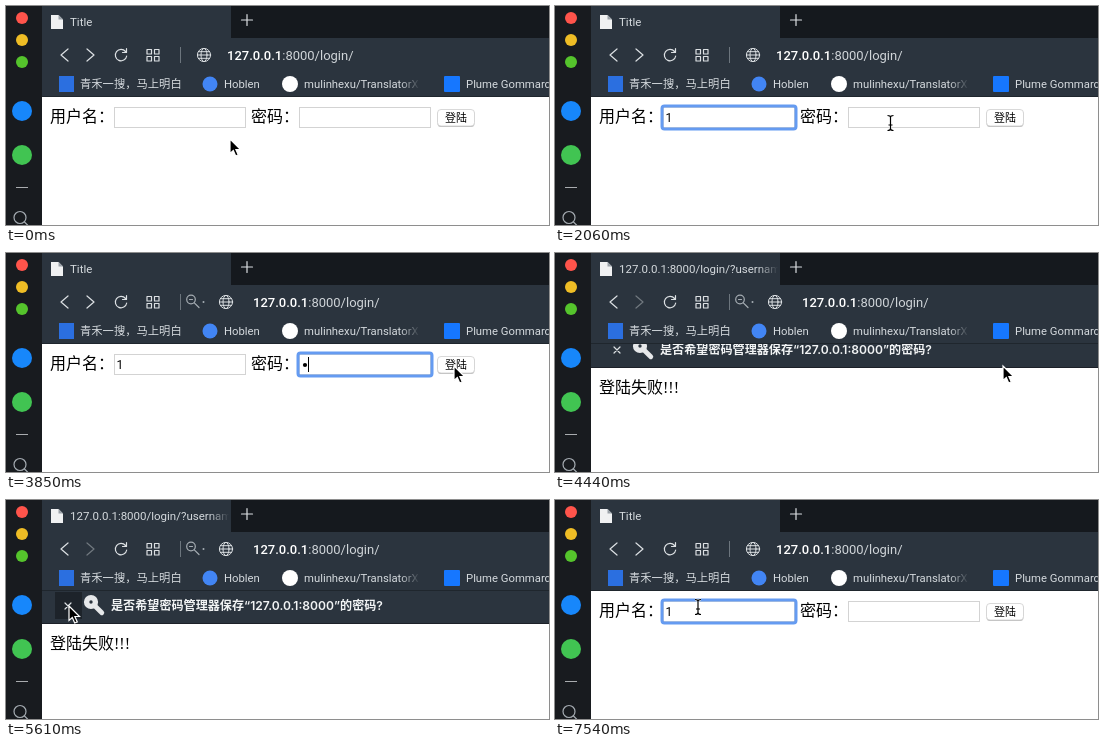
Animation of 543 by 219 pixels, one loop 7990 ms. Source, as an HTML page:

```html
<!DOCTYPE html>
<html lang="zh-CN">
<head>
<meta charset="utf-8">
<title>Login</title>
<style>
  html, body { margin: 0; width: 100%; height: 100%; overflow: hidden; background: #fff; }
  svg { display: block; width: 100vw; height: 100vh; }
  text { font-family: Roboto, "Noto Sans CJK SC", "Noto Sans CJK", sans-serif; }
  .line { fill: none; stroke: #dce0e3; stroke-width: 1.2; stroke-linecap: round; stroke-linejoin: round; }
  .thin { stroke-width: 1; }
  .dim { stroke: #a5acb2; }
  .tab { font-size: 11.5px; fill: #d5dade; }
  .mark { font-size: 11.3px; fill: #d5dade; }
  .url { font-size: 13px; fill: #d0d5d9; }
  .url tspan { fill: #fff; font-weight: 500; }
  .ask { font: 600 12.1px Inter, "Noto Sans CJK SC", "Noto Sans CJK", sans-serif; fill: #f1f3f4; }
  .body { font: 500 16px "Liberation Serif", "Noto Sans CJK SC", "Noto Sans CJK", serif; fill: #000; }
  .field { fill: #fff; stroke: #d3d3d3; }
  .ring { fill: none; stroke: #659bf1; stroke-width: 3; }
  .small { font-size: 12px; fill: #000; }
</style>
</head>
<body>
<svg viewBox="0 0 543 219" preserveAspectRatio="none">
  <defs>
    <linearGradient id="fade">
      <stop offset="0" stop-color="#2b343e" stop-opacity="0"/>
      <stop offset="1" stop-color="#2b343e"/>
    </linearGradient>
    <clipPath id="tabClip"><rect x="36" width="187" height="32"/></clipPath>
  </defs>

  <rect width="543" height="219" fill="#fff"/>

  <g id="form">
    <text class="body" x="44" y="116">用户名：</text>
    <rect class="field" x="108.5" y="101.5" width="131" height="20"/>
    <text class="body" x="245" y="116">密码：</text>
    <rect class="field" x="293.5" y="101.5" width="131" height="20"/>
    <rect x="431.5" y="104" width="37" height="17" rx="3.5" fill="#bdbdbd"/>
    <rect x="431.5" y="103.5" width="37" height="16.5" rx="3.5" fill="#fff" stroke="#d0d0d0" stroke-width=".8"/>
    <text class="small" x="450" y="116" text-anchor="middle" style="font-size:11px">登陆</text>
    <rect id="ring" class="ring" y="100" width="134" height="23" rx="2.5"/>
    <text id="user" class="small" x="110.5" y="116">1</text>
    <circle id="dot" cx="299" cy="112" r="2.1"/>
    <rect id="caret" y="104" width="1" height="15"/>
  </g>

  <text id="fail" class="body" x="44" y="116">登陆失败!!!</text>

  <g id="bar">
    <rect x="36" y="91" width="507" height="33" fill="#2b343e"/>
    <rect x="36" y="123" width="507" height="1" fill="#1c2028"/>
    <rect id="hover" x="49" y="92" width="27" height="27" fill="#1d232a"/>
    <path class="line" d="M59 103l6 6m0-6l-6 6"/>
    <g fill="none" stroke="#e6e8ea" stroke-linecap="round">
      <circle cx="85" cy="102" r="4.4" stroke-width="5.4"/>
      <path d="M89 106l6.800 6.800" stroke-width="4.800"/>
    </g>
    <text class="ask" x="105" y="110">是否希望密码管理器保存“127.0.0.1:8000”的密码?</text>
  </g>

  <rect x="36" width="507" height="33" fill="#15191e"/>
  <rect x="36" y="32" width="507" height="59" fill="#2b343e"/>
  <rect x="36" y="90" width="507" height="1" fill="#1f262d"/>
  <rect x="36" width="189" height="33" fill="#2b343e"/>
  <path d="M45 9h7.500l4.500 4.500v9.500h-12z" fill="#f0f1f2"/>
  <path d="M52.500 9v4.500h4.500" fill="#9aa1a8"/>
  <g clip-path="url(#tabClip)">
    <text id="title" class="tab" x="64" y="20"></text>
    <rect x="203" y="6" width="20" height="20" fill="url(#fade)"/>
  </g>
  <path class="line" d="M235.500 14h11m-5.500-5.500v11"/>

  <path class="line" d="M62 43l-7 6 7 6"/>
  <path id="next" class="line" d="M81 43l7 6-7 6"/>
  <path class="line" d="M119.500 45.500a5.700 5.700 0 1 0 1.200 4.500M120.500 42.500v4h-4"/>
  <path class="line" d="M141 43.500h4.500v4.500h-4.500zm7.500 0h4.500v4.500h-4.500zm-7.500 7h4.500v4.500h-4.500zm7.500 0h4.500v4.500h-4.500z"/>
  <path d="M174.500 41v16" stroke="#6c757d"/>
  <g id="key">
    <g class="line dim">
      <circle cx="185" cy="46.500" r="4.300"/>
      <path d="M183.500 46.500h3M188.300 49.800l4.700 4.700"/>
    </g>
    <circle cx="197.500" cy="49" r="1" fill="#a7aeb4"/>
  </g>
  <g id="globe" class="line thin">
    <circle cx="198" cy="49" r="6.600"/>
    <ellipse cx="198" cy="49" rx="3" ry="6.600"/>
    <path d="M191.500 49h13m-12-3.300h11m-11 6.600h11"/>
  </g>
  <text id="url" class="url" y="54"><tspan>127.0.0.1</tspan>:8000/login/</text>

  <rect x="53" y="70" width="15" height="16" fill="#2b6fe0"/>
  <text class="mark" x="74" y="82">青禾一搜，马上明白</text>
  <circle cx="204" cy="78" r="7.500" fill="#4285f4"/>
  <text class="mark" x="218" y="82">Hoblen</text>
  <circle cx="284" cy="78" r="8" fill="#fff"/>
  <text class="mark" x="298" y="82">mulinhexu/TranslatorX</text>
  <rect x="394" y="70" width="20" height="17" fill="url(#fade)"/>
  <rect x="414" y="70" width="16" height="17" fill="#2b343e"/>
  <rect x="438" y="70" width="16" height="16" rx="1" fill="#1677ff"/>
  <text class="mark" x="460" y="82">Plume Gommard</text>

  <rect width="36" height="219" fill="#181b1f"/>
  <circle cx="16" cy="12" r="6" fill="#ff544b"/>
  <circle cx="16" cy="34" r="6" fill="#efbd25"/>
  <circle cx="16" cy="56" r="6" fill="#55c42c"/>
  <circle cx="16" cy="105" r="10" fill="#1787fb"/>
  <circle cx="16" cy="149" r="10" fill="#41c452"/>
  <path d="M10 181.500h12" stroke="#a9acaf"/>
  <path class="line dim" d="M18.500 216l4 4M20 211.500a6 6 0 1 1-12 0a6 6 0 1 1 12 0"/>

  <path id="arrow" d="M0 0v14.500l3.300-3 2.400 5.500 2.600-1.100-2.400-5.400h4.600z" fill="#000" stroke="#fff" stroke-width="1.200"/>
  <g id="beam" fill="none">
    <path d="M-3-7.500q3 0 3 2v11q0 2-3 2M3-7.500q-3 0-3 2v11q0 2 3 2M-2 2h4" stroke="#fff" stroke-width="2.600" opacity=".8"/>
    <path d="M-3-7.500q3 0 3 2v11q0 2-3 2M3-7.500q-3 0-3 2v11q0 2 3 2M-2 2h4" stroke="#000" stroke-width="1.200"/>
  </g>
</svg>
<script>
const LOOP = 7990, TICKS = 54;
const el = {};
document.querySelectorAll('[id]').forEach(e => el[e.id] = e);

// Pointer runs: first tick, shape, one position per tick; the last one holds.
const runs = [
  [0, 'arrow', [224, 133], [206, 119]],
  [2, 'beam', [180, 112], [172, 112]],
  [4, 'arrow', [238, 160], [291, 198]],
  [10, 'hidden', [0, 0]],
  [12, 'beam', [262, 111], [306, 114], [335.5, 117]],
  [16, 'beam', [335.5, 110]],
  [19, 'hidden', [0, 0]],
  [21, 'arrow', [372, 120], [405, 130], [440, 132], [467, 125], [456, 117], [448, 113]],
  [32, 'arrow', [410, 148], [300, 167], [190, 152], [110, 132], [74, 114], [63, 106]],
  [41, 'arrow', [61, 84], [59, 62], [58, 49]],
  [45, 'arrow', [72, 62], [105, 88]],
  [47, 'beam', [138, 104], [143, 107]]
];

// Caret spans: first tick, end tick, x.
const carets = [[3, 9, 111], [10, 14, 117], [16, 19, 296], [19, 22, 302], [25, 28, 302], [48, 51, 117]];

const within = (n, a, b) => n >= a && n < b;
const show = (e, on) => e.setAttribute('visibility', on ? 'visible' : 'hidden');
const move = (e, x, y) => e.setAttribute('transform', `translate(${x} ${y})`);

function barHeight(n) {
  if (n < 31) return Math.max(0, Math.min(24, (n - 28) * 12));
  return n < 39 ? 33 : Math.max(0, 33 - (n - 38) * 11);
}

function drawPointer(n) {
  const [start, shape, ...path] = runs.filter(r => r[0] <= n).pop();
  const [x, y] = path[Math.min(n - start, path.length - 1)];
  for (const name of ['arrow', 'beam']) {
    show(el[name], name === shape);
    move(el[name], x, y);
  }
}

function drawForm(n, visible) {
  const inUser = within(n, 3, 16) || n >= 48;
  const inPass = within(n, 16, 28);
  const caret = carets.find(c => within(n, c[0], c[1]));
  show(el.form, visible);
  show(el.ring, visible && (inUser || inPass));
  el.ring.setAttribute('x', inPass ? 292 : 107);
  show(el.user, visible && n >= 10);
  show(el.dot, within(n, 19, 28));
  show(el.caret, visible && caret);
  if (caret) el.caret.setAttribute('x', caret[2]);
}

function render(ms) {
  const n = Math.min(TICKS - 1, Math.floor((ms % LOOP + 16) * TICKS / LOOP));
  const failed = within(n, 28, 44);
  const hasKey = within(n, 19, 44);
  const drop = barHeight(n);

  drawForm(n, !failed);
  show(el.fail, failed);
  move(el.fail, 0, drop);
  show(el.bar, drop > 0);
  move(el.bar, 0, drop - 33);
  show(el.hover, within(n, 36, 40) && drop > 0);

  el.title.textContent = failed ? '127.0.0.1:8000/login/?usernam' : 'Title';
  el.next.setAttribute('opacity', failed ? .4 : 1);
  show(el.key, hasKey);
  move(el.globe, hasKey ? 22 : 0, 0);
  el.url.setAttribute('x', hasKey ? 247 : 221);
  drawPointer(n);
}

const begin = performance.now();
function loop() {
  render(performance.now() - begin);
  requestAnimationFrame(loop);
}
loop();
</script>
</body>
</html>
```
